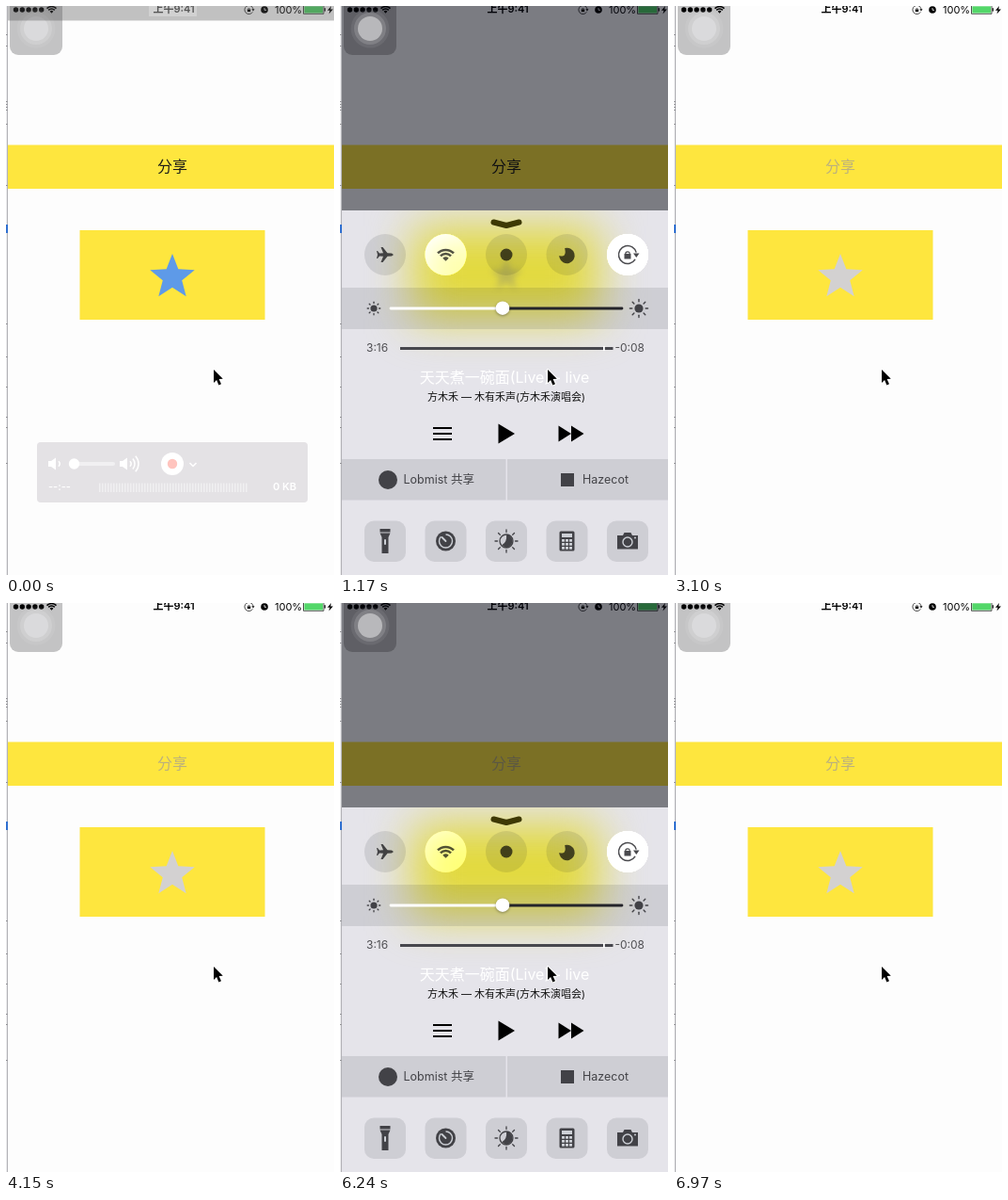
Write an HTML page with a canvas that moves like this. It is 349x604 px and loops after 8 s.

```html
<!DOCTYPE html>
<html lang="zh">
<head>
<meta charset="utf-8">
<title>Control panel</title>
<style>
  html, body { margin: 0; width: 100%; height: 100%; overflow: hidden; background: #fdfdfd; }
  canvas { display: block; width: 349px; height: 604px; }
</style>
</head>
<body>
<canvas id="stage"></canvas>
<script>
const W = 349, H = 604, LOOP = 8000, STEP = 148.6;
const PANEL_H = 387;
const FONT = 'Inter, "Noto Sans CJK SC", "Noto Sans CJK", sans-serif';
const YELLOW = '#fee63e', INK = 'rgba(0,0,5,.68)', SHADE = 'rgba(0,10,20,.1)';
const COLUMNS = [48, 112.5, 177, 241.5, 306];
const TAU = Math.PI * 2;

const canvas = document.getElementById('stage');
const g = canvas.getContext('2d');
const dpr = window.devicePixelRatio || 1;
canvas.width = W * dpr;
canvas.height = H * dpr;

const clamp = v => Math.max(0, Math.min(1, v));
const ramp = (s, from, span) => clamp((s - from) / span);
const smooth = u => u * u * (3 - 2 * u);
const mix = (a, b, u) => a + (b - a) * u;

function rect(x, y, w, h, fill) {
  g.fillStyle = fill;
  g.fillRect(x, y, w, h);
}
function round(x, y, w, h, r, fill) {
  g.beginPath();
  g.roundRect(x, y, w, h, r);
  g.fillStyle = fill;
  g.fill();
}
function disc(x, y, r, fill) {
  g.beginPath();
  g.arc(x, y, r, 0, TAU);
  g.fillStyle = fill;
  g.fill();
}
function trace(points, close) {
  g.beginPath();
  points.forEach(([x, y]) => g.lineTo(x, y));
  if (close) g.closePath();
}
function poly(points, fill) {
  trace(points, true);
  g.fillStyle = fill;
  g.fill();
}
function line(points, color, width, cap = 'butt') {
  trace(points);
  g.strokeStyle = color;
  g.lineWidth = width;
  g.lineCap = cap;
  g.lineJoin = 'round';
  g.stroke();
}
function arc(x, y, r, a, b, color, width) {
  g.beginPath();
  g.arc(x, y, r, a, b);
  g.strokeStyle = color;
  g.lineWidth = width;
  g.lineCap = 'butt';
  g.stroke();
}
function text(str, x, y, size, color, align = 'center', weight = 400) {
  g.font = `${weight} ${size}px ${FONT}`;
  g.textAlign = align;
  g.textBaseline = 'middle';
  g.fillStyle = color;
  g.fillText(str, x, y);
}
function at(x, y, scale, draw) {
  g.save();
  g.translate(x, y);
  g.scale(scale, scale);
  draw();
  g.restore();
}

// Icons, drawn around the origin
function wifi(color) {
  const a = -Math.PI * .75, b = -Math.PI * .25;
  arc(0, 7, 12.2, a, b, color, 2.6);
  arc(0, 7, 8, a, b, color, 2.6);
  g.beginPath();
  g.moveTo(0, 7);
  g.arc(0, 7, 4.6, a, b);
  g.fillStyle = color;
  g.fill();
}
function plane() {
  poly([[9, 0], [7, -1.6], [2.5, -1.8], [-2.5, -8], [-4.5, -8], [-2, -1.8], [-6, -1.5],
    [-8, -4], [-9, -4], [-8, 0], [-9, 4], [-8, 4], [-6, 1.5], [-2, 1.8], [-4.5, 8],
    [-2.5, 8], [2.5, 1.8], [7, 1.6]], INK);
}
function moon() {
  g.beginPath();
  g.arc(0, 0, 8.2, -1.85, 3.4 - TAU + TAU - .25, false);
  g.quadraticCurveTo(0, 3, -2.3, -7.9);
  g.fillStyle = INK;
  g.fill();
}
function lock(color) {
  rect(-3.5, -1, 7, 5.5, color);
  arc(0, -1, 2.2, Math.PI, TAU, color, 1.2);
}
function turnLock(color) {
  arc(0, 0, 9.5, .55, TAU - .25, color, 1.5);
  poly([[6, -1.5], [12.5, -1.5], [9.3, 3]], color);
  lock(color);
}
function sun(core, inner, outer, width) {
  disc(0, 0, core, INK);
  for (let i = 0; i < 8; i++) {
    const c = Math.cos(i * TAU / 8), s = Math.sin(i * TAU / 8);
    line([[c * inner, s * inner], [c * outer, s * outer]], INK, width, 'round');
  }
}
function torch() {
  rect(-5.5, -13, 11, 3.5, INK);
  poly([[-5.5, -8.5], [5.5, -8.5], [3.5, -4], [3.5, 13], [-3.5, 13], [-3.5, -4]], INK);
  round(-1, -2, 2, 6, 1, '#cdd0d6');
}
function timer() {
  disc(0, 0, 10.5, INK);
  arc(0, 0, 7, -1.57, 3.9, '#cdd0d6', 1.4);
  line([[-4, -4], [0, 0]], '#cdd0d6', 1.8, 'round');
}
function nightSun() {
  arc(0, 0, 7, 0, TAU, INK, 1.3);
  g.beginPath();
  g.moveTo(0, -7);
  g.arc(0, 0, 6.4, -1.57, 2.4);
  g.quadraticCurveTo(1, 1, 0, -7);
  g.fillStyle = INK;
  g.fill();
  sun(0, 9.5, 12, 1.3);
}
function calculator() {
  round(-8, -10.5, 16, 21, 1.5, INK);
  rect(-5.5, -8, 11, 4, '#cdd0d6');
  for (let i = 0; i < 9; i++) {
    rect(-5.5 + i % 3 * 4, -2 + Math.floor(i / 3) * 4, 3, 2.7, '#cdd0d6');
  }
}
function camera() {
  poly([[-11, -6], [-5, -6], [-3.5, -9], [3.5, -9], [5, -6], [11, -6], [11, 8.5], [-11, 8.5]], INK);
  arc(0, 1, 5, 0, TAU, '#cdd0d6', 1.4);
  disc(8, -3.5, 1, '#cdd0d6');
}
function speaker(waves) {
  poly([[0, -3], [3, -3], [8, -6.5], [8, 6.5], [3, 3], [0, 3]], '#fff');
  for (let i = 0; i < waves; i++) arc(8, 0, 4 + i * 4, -.75, .75, '#fff', 1.5);
}
function star(x, y, r, fill) {
  const points = [];
  for (let i = 0; i < 10; i++) {
    const a = i * Math.PI / 5, d = i % 2 ? r * .43 : r;
    points.push([x + d * Math.sin(a), y - d * Math.cos(a)]);
  }
  poly(points, fill);
}

function statusBar() {
  for (let i = 0; i < 5; i++) disc(10.5 + i * 6.8, 4, 2.7, '#000');
  at(48.5, 3.6, .58, () => wifi('#000'));
  text('上午9:41', 178.5, 4, 11, '#000', 'center', 600);
  at(258.5, 4, .48, () => turnLock('#000'));
  disc(275, 4, 3.8, '#000');
  line([[275, 2], [275, 4.3], [277, 4.3]], '#fff', .8);
  text('100%', 286, 4.3, 11, '#000', 'left');
  g.strokeStyle = '#222';
  g.lineWidth = .8;
  g.strokeRect(316.5, -.5, 21.5, 8.8);
  rect(317.4, .3, 19.7, 7.2, '#53d769');
  rect(338.6, 2.2, 1.4, 3.4, '#222');
  poly([[346, 0], [342, 4.8], [344.6, 4.8], [343.5, 8.6], [348, 3.4], [345.3, 3.4]], '#000');
}

function page(s) {
  rect(0, 0, W, H, '#fdfdfd');
  rect(2, 147.5, W - 2, 46.5, YELLOW);
  rect(78.5, 238, 197, 95, YELLOW);
  const f = ramp(s, 2360, 300);
  text('分享', 177, 171, 16, `rgb(${mix(30, 188, f)},${mix(30, 177, f)},${mix(24, 124, f)})`);
  star(177, 288, 25, s < 2500 ? '#5e9ae8' : '#d3d1d1');
  statusBar();
}

function edge() {
  rect(0, 0, 1, H, '#ececee');
  rect(1, 0, 1, H, '#b2b2b6');
  for (const y of [30, 42, 101, 104, 107, 110, 125, 190, 337, 372, 404, 436, 447, 485]) {
    rect(0, y, 1.5, 1, '#8c8c90');
  }
  rect(0, 232, 2, 9, '#2f6fd0');
}

function touchButton() {
  round(4, -8, 56, 60, 9, 'rgba(0,0,5,.23)');
  disc(32, 24, 20.5, 'rgba(255,255,255,.07)');
  disc(32, 24, 17, 'rgba(255,255,255,.15)');
  disc(32, 24, 13, 'rgba(226,226,228,.57)');
}

function recorder(alpha) {
  g.save();
  g.globalAlpha = alpha;
  rect(2, 0, W - 2, 15.5, 'rgba(80,80,80,.35)');
  rect(152, 0, 51, 11, 'rgba(255,255,255,.25)');
  round(33, 463, 288, 64, 4, '#e4e2e5');
  at(45, 486, 1, () => speaker(1));
  line([[72, 486], [114, 486]], '#f1f0f2', 4, 'round');
  disc(72.5, 486, 5.7, '#fff');
  at(121, 486, 1, () => speaker(3));
  disc(177, 486, 12, '#fff');
  disc(177, 486, 5.2, '#ffc4be');
  line([[195.5, 485], [199, 488.5], [202.5, 485]], '#fff', 1.6);
  text('--:--', 45, 511, 11, '#fff', 'left', 600);
  for (let x = 99; x < 256; x += 3) rect(x, 506.5, 1.5, 9.5, '#f0eff1');
  text('0 KB', 309, 511, 11, '#fff', 'right', 600);
  g.restore();
}

function glow(strength, blue) {
  g.save();
  g.globalAlpha = strength;
  g.filter = `blur(${24 * dpr}px)`;
  rect(78, 234, 197, 98, '#e2d93c');
  if (blue) {
    g.filter = `blur(${3 * dpr}px)`;
    star(177, 286, 18, 'rgba(140,140,110,.4)');
  }
  g.restore();
}

function toggles(wifiOn) {
  COLUMNS.forEach((x, i) => {
    const on = i === 1 ? wifiOn : i === 4 ? 1 : 0;
    disc(x, 47, 22, `rgba(0,10,20,${.1 * (1 - on)})`);
    g.save();
    g.globalCompositeOperation = 'lighter';
    disc(x, 47, 22, `rgba(110,110,110,${on})`);
    g.restore();
  });
  at(48, 47, 1, plane);
  at(112.5, 47, .98, () => wifi(INK));
  disc(177, 47, 6.5, INK);
  at(241.5, 48, 1, moon);
  at(306, 47, 1, () => turnLock('#4a4a4e'));
}

function player() {
  text('3:16', 28, 146.5, 12, 'rgba(0,0,5,.66)', 'left');
  text('-0:08', 324, 146.5, 12, 'rgba(0,0,5,.66)', 'right');
  rect(64, 145, 226.5, 3, '#47474d');
  rect(280, 144, 1.8, 5, '#fff');
  text('天天煮一碗面(Live) - live', 175, 178.5, 16, '#fff');
  text('方木禾 — 木有禾声(方木禾演唱会)', 177, 198.5, 11, '#111');
  for (let i = 0; i < 3; i++) rect(99, 230 + i * 6, 20, 2, '#000');
  for (const [x, w, h] of [[168.5, 17.5, 10.5], [232.5, 13.5, 8.5], [246, 13.5, 8.5]]) {
    poly([[x, 237 - h], [x + w, 237], [x, 237 + h]], '#000');
  }
}

function brightness() {
  rect(2, 82, W - 2, 44, SHADE);
  at(36, 104, 1, () => sun(3.6, 5.6, 6.8, 1.3));
  at(318, 104, 1, () => sun(4.6, 7.2, 9.6, 1.4));
  line([[173, 104], [300, 104]], '#24242a', 2.8, 'round');
  line([[54, 104], [173, 104]], '#fff', 2.8, 'round');
  g.save();
  g.shadowColor = 'rgba(0,0,0,.35)';
  g.shadowBlur = 3 * dpr;
  g.shadowOffsetY = dpr;
  disc(173, 103.7, 7.3, '#fff');
  g.restore();
}

function panel(s, p) {
  const top = H - PANEL_H * p;
  const wifiOn = 1 - ramp(s, 1400, 250) + ramp(s, 6090, 290);
  const note = s < 3110 ? ramp(s, 1440, 300) : 0;
  g.save();
  g.beginPath();
  g.rect(2, top, W - 2, H - top);
  g.clip();
  rect(0, top, W, H, '#e5e4ea');
  glow(ramp(p, .6, .4), s < 2500);
  g.translate(0, top);

  const bend = ramp(p, .85, .15);
  g.globalAlpha = 1 - note;
  line([[163.5, mix(14.5, 12.5, bend)], [177, mix(14.5, 16, bend)], [190.5, mix(14.5, 12.5, bend)]],
    `rgb(${mix(72, 62, bend)},${mix(71, 57, bend)},${mix(78, 4, bend)})`, 6, 'round');
  g.globalAlpha = note;
  text('Wi-Fi: 关闭', 177, 12.5, 13, '#fff');
  g.globalAlpha = 1;

  toggles(wifiOn);
  brightness();
  player();

  rect(2, 264, 174.5, 43.5, SHADE);
  rect(178, 264, W - 178, 43.5, SHADE);
  disc(51, 286, 10, INK);
  rect(235, 279, 14, 14, INK);
  text('Lobmist 共享', 67.5, 286, 12.5, INK, 'left');
  text('Hazecot', 258, 286, 12.5, INK, 'left');

  [torch, timer, nightSun, calculator, camera].forEach((icon, i) => {
    round(COLUMNS[i] - 22, 329.5, 44, 43.5, 10, SHADE);
    at(COLUMNS[i], 351, 1, icon);
  });
  g.restore();
}

function cursor() {
  const shape = [[0, 0], [0, 14], [3.1, 11], [5.4, 16.4], [8, 15.3], [5.6, 10], [9.8, 9.8]];
  at(221, 386, 1, () => {
    trace(shape, true);
    g.strokeStyle = '#fff';
    g.lineWidth = 2;
    g.lineJoin = 'round';
    g.stroke();
    poly(shape, '#000');
  });
}

function openness(s) {
  const up = from => 1 - (1 - ramp(s, from, 530)) ** 3;
  const down = (from, span) => smooth(ramp(s, from, span));
  return clamp(up(152) - down(2835, 280) + up(5205) - down(6395, 520));
}

function draw(s) {
  const p = openness(s);
  g.setTransform(dpr, 0, 0, dpr, 0, 0);
  page(s);
  rect(2, 0, W - 2, H, `rgba(0,3,14,${.515 * p})`);
  touchButton();
  edge();
  const fade = 1 - ramp(s, 0, 280);
  if (fade > 0) recorder(fade);
  if (p > 0) panel(s, p);
  cursor();
}

let shown = -1;
function tick() {
  const step = Math.floor((performance.now() % LOOP + 22) / STEP);
  if (step !== shown) {
    shown = step;
    draw(step * STEP);
  }
  requestAnimationFrame(tick);
}
tick();
</script>
</body>
</html>
```
